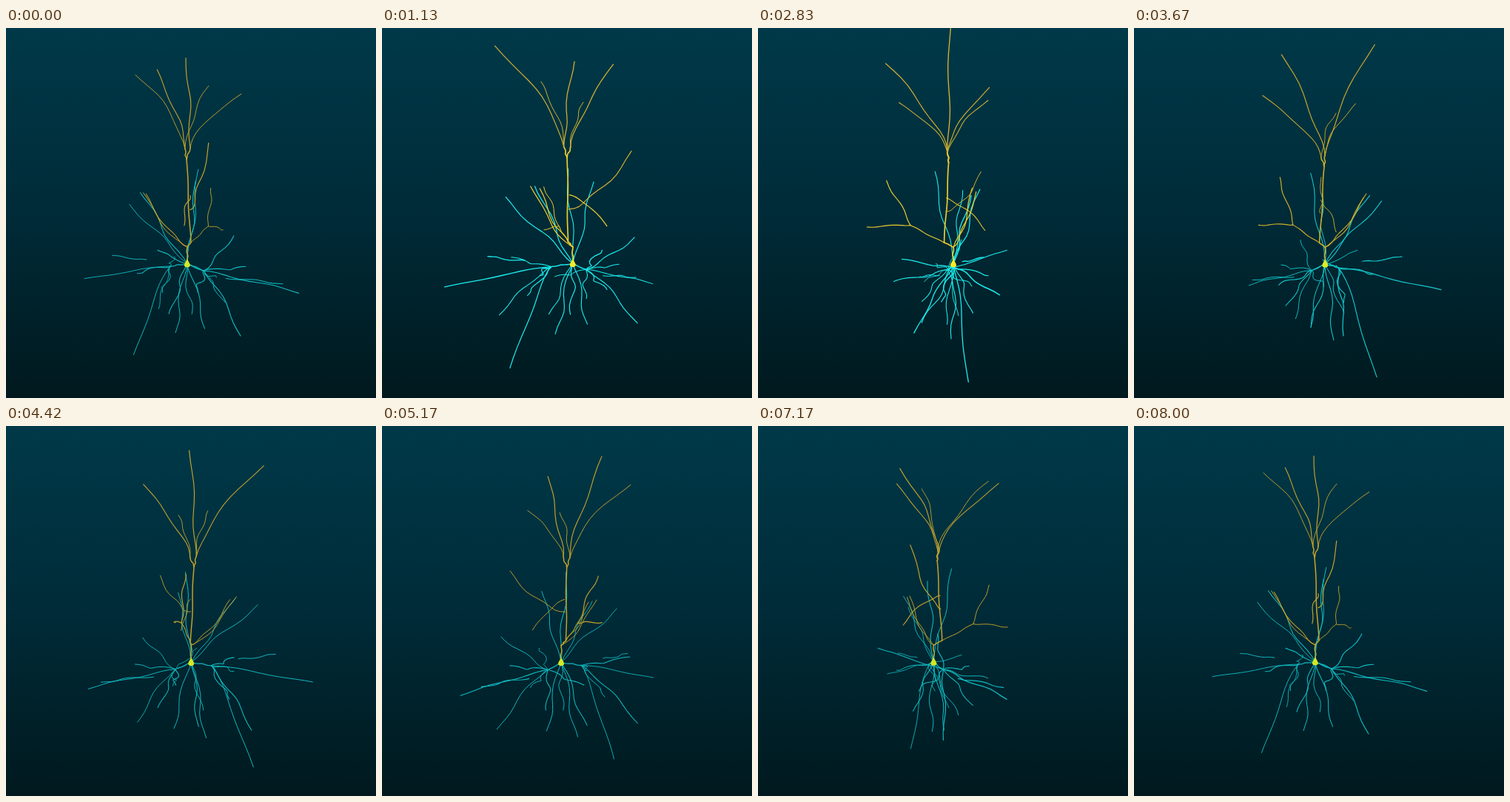
An HTML page that plays this animation: 500 by 500 pixels, repeating every 8040 ms.

```html
<!DOCTYPE html>
<html lang="en">
<head>
<meta charset="utf-8">
<title>Rotating neuron</title>
<style>
  html, body { margin: 0; width: 100%; height: 100%; overflow: hidden; background: #002733; }
  svg { display: block; width: 100%; height: 100%; }
  path { fill: none; stroke-linecap: round; stroke-linejoin: round; }
</style>
</head>
<body>
<svg id="stage" viewBox="0 0 500 500">
  <defs>
    <linearGradient id="depth" x1="0" y1="0" x2="0" y2="1">
      <stop offset="0" stop-color="#003949"/>
      <stop offset=".5" stop-color="#002b38"/>
      <stop offset="1" stop-color="#00191e"/>
    </linearGradient>
  </defs>
  <rect width="500" height="500" fill="url(#depth)"/>
</svg>
<script>
const LOOP = 8040, TURN = 8000, STEPS = 192;
const CAMERA = 560, CENTER = 250, HORIZON = 300;
const GOLDEN_ANGLE = Math.PI * (3 - Math.sqrt(5));
const stage = document.getElementById('stage');

const palette = {
  cyan: [[17, 184, 190], [30, 250, 250]],
  gold: [[194, 164, 43], [245, 218, 48]],
  tuft: [[194, 164, 43], [214, 182, 52]],
  soma: [[212, 232, 38], [255, 236, 44]]
};

let seed = 7;
const random = () => (seed = seed * 16807 % 2147483647) / 2147483647;
const lerp = (a, b, k) => a + (b - a) * k;
const addPath = () =>
  stage.appendChild(document.createElementNS('http://www.w3.org/2000/svg', 'path'));

const fibers = [];

// A branch leaves its root, spreads and rises at its own pace, and sways a little.
function grow(root, tip, { hue, width = 1, spread = 1, rise = 1, sway = 3 }) {
  const phase = random() * 6, waves = lerp(5, 9, random());
  const points = [];
  for (let i = 0; i <= 12; i++) {
    const u = i / 12, out = u ** spread;
    const bend = sway * Math.sin(Math.PI * u);
    points.push([
      lerp(root[0], tip[0], out) + bend * Math.sin(phase + waves * u),
      lerp(root[1], tip[1], u ** rise) + bend * .5 * Math.sin(phase * 2 + waves * u),
      lerp(root[2], tip[2], out) + bend * Math.cos(phase + waves * u)
    ]);
  }
  fibers.push({ points, hue, width, node: addPath() });
}
const growAll = (root, tips, style) => tips.forEach(tip => grow(root, tip, style));

// Points are [x, y, z]: y grows downward, z points to the viewer at rest.
const soma = [-5, 19, 14], collar = [-5, -4, 14], knee = [0, -10, 2];
const crown = [-6, -117, 5], forkLeft = [-8, -131, 1], forkRight = [-1, -131, 7];
const hubs = [[-28, 23, -4], [16, 28, 20]];

// Basal dendrites share the hub that lies on their side.
const dot = (a, b) => a[0] * b[0] + a[2] * b[2];
const hubFor = tip => dot(hubs[0], tip) > dot(hubs[1], tip) ? hubs[0] : hubs[1];

const basal = { hue: 'cyan', rise: 1.2 };
growAll(soma, hubs, { hue: 'cyan', width: 1.3, sway: 1 });
growAll(soma, [[-87, -62, -26], [-68, -74, 5], [10, -106, -6], [6, -84, 40]], { hue: 'cyan', sway: 4 });

const longArms = [[-157, 44, -51], [130, 54, 60], [-81, 154, -25], [58, 104, 75], [-50, 95, -80], [50, -16, 75]];
longArms.forEach(tip => grow(hubFor(tip), tip, basal));

// Side arms of the two longest dendrites
growAll([-62, 14, -18], [[-112, 8, -30]], basal);
growAll([45, 38, 28], [[115, 44, 40]], basal);

// Shorter dendrites fan out: the steeper they fall, the closer they stay.
const RAYS = 12;
for (let i = 0; i < RAYS; i++) {
  const fall = (i + .5) / RAYS, turn = 2 + i * GOLDEN_ANGLE, reach = lerp(95, 18, fall);
  const tip = [reach * Math.cos(turn), lerp(-5, 122, fall), reach * Math.sin(turn)];
  grow(fall > .7 ? soma : hubFor(tip), tip, { hue: 'cyan', sway: 5 });
}

const trunk = { hue: 'gold', width: 1.5, sway: 1 };
grow(soma, collar, trunk);
grow(collar, knee, trunk);
grow(knee, crown, trunk);
growAll(crown, [forkLeft, forkRight], trunk);

const tuft = { hue: 'tuft', spread: 1.5 };
growAll(forkLeft, [[-82, -248, -52], [27, -240, -73], [-42, -216, 46]], tuft);
growAll(forkRight, [[-6, -216, 78], [71, -212, -26]], tuft);

const oblique = { hue: 'gold', rise: 1.4 };
const sideFork = [25, -33, -36];
grow(knee, sideFork, { hue: 'gold', sway: 1 });
growAll(sideFork, [[50, -30, -88], [30, -90, -70]], { hue: 'gold' });
growAll(collar, [[-65, -75, -5], [-60, -72, 6]], oblique);
grow([-1, -52, 4], [20, -118, 88], { hue: 'tuft', rise: 1.7 });
grow([-1, -70, 5], [-8, -28, 70], { hue: 'gold', rise: 1.5 });

const body = addPath();

function project([x, y, z], angle) {
  const c = Math.cos(angle), s = Math.sin(angle);
  const scale = CAMERA / (CAMERA - (z * c - x * s));
  const lift = .055 * Math.abs(y) * Math.cos(angle - Math.PI / 4);
  return [CENTER + (x * c + z * s) * scale, HORIZON + y * scale - lift, scale];
}

const mix = ([a, b], k) => `rgb(${a.map((v, i) => Math.round(lerp(v, b[i], k)))})`;

function draw(time) {
  const step = Math.floor((time % LOOP + 5) * STEPS / TURN);
  const angle = step / STEPS * 2 * Math.PI;
  const glow = Math.max(0, Math.cos(angle - 1.55));

  for (const { points, hue, width, node } of fibers) {
    const flat = points.map(p => project(p, angle));
    const tip = flat[flat.length - 1];
    node.setAttribute('d', 'M' + flat.map(p => `${p[0].toFixed(2)} ${p[1].toFixed(2)}`).join('L'));
    node.setAttribute('stroke', mix(palette[hue], glow));
    node.setAttribute('stroke-width', (width * tip[2] * (1 + .15 * glow)).toFixed(2));
  }

  const [x, y] = project(soma, angle);
  body.setAttribute('d', `M${x} ${y - 7}c1.5 4 4 6 4 9c-.5 3.5 -7.5 3.5 -8 0c0 -3 2.5 -5 4 -9Z`);
  body.style.fill = mix(palette.soma, glow);
}

const start = performance.now();
function tick() {
  draw(performance.now() - start);
  requestAnimationFrame(tick);
}
tick();
</script>
</body>
</html>
```
